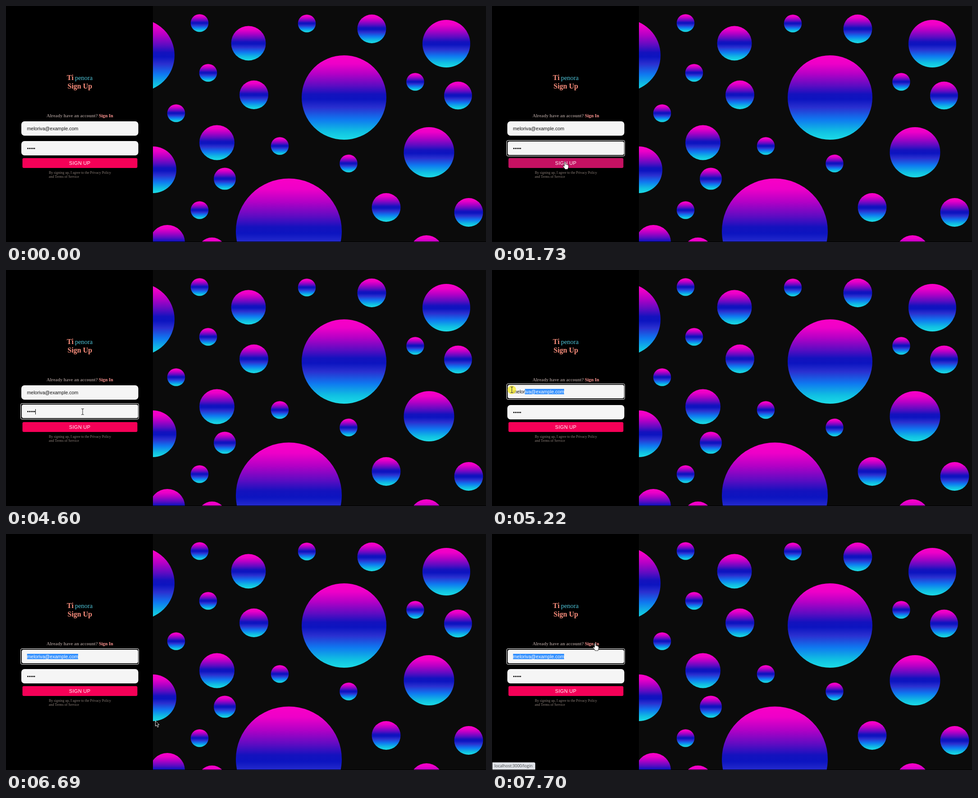
Recreate the animation shown at these times as an HTML page. Size 1065 px wide and 526 px high, loop 8000 ms.

```html
<!DOCTYPE html>
<html lang="en">
<head>
<meta charset="utf-8">
<title>Sign Up</title>
<style>
html, body { margin: 0; width: 100%; height: 100%; overflow: hidden; background: #000; }
svg { display: block; width: 100vw; height: 100vh; }
text { white-space: pre; }
.serif { font-family: "Liberation Serif", "Times New Roman", serif; }
.sans { font-family: "Liberation Sans", Arial, sans-serif; }
.bold { font-weight: 700; }
.salmon { fill: #fa8e7c; }
.field { fill: #f5f5f5; }
.value { font-size: 10.6px; fill: #111; }

/* every track shares one 8 s clock */
.track { animation: 8s linear infinite; }
.cut { animation: 8s step-end infinite; }

#email { animation-name: lift-email; }
#password { animation-name: lift-password; }
#button { animation-name: hover-button; }
#email .ring { animation-name: focus-email; }
#password .ring { animation-name: focus-password; }
#selection { animation-name: select; }
#caret { animation-name: blink; }
#status { animation-name: status; }
#pointer { animation-name: travel; }
#press { animation-name: press; }
#arrow { animation-name: arrow; }
#beam { animation-name: beam; }
#hand { animation-name: hand; }

@keyframes travel {
  0%, 3.37% { transform: translate(953px, 491px); }
  7.5% { transform: translate(560px, 385px); }
  10.6% { transform: translate(290px, 320px); }
  12.87%, 13.75% { transform: translate(190px, 314px); }
  16.8% { transform: translate(172px, 318px); }
  19.3% { transform: translate(163px, 338px); }
  21.5%, 30.1% { transform: translate(162px, 348px); }
  30.2%, 51.6% { transform: translate(164px, 351px); }
  53.5% { transform: translate(168px, 357px); }
  55.6% { transform: translate(172px, 330px); }
  57.5% { transform: translate(170px, 316px); }
  59.4% { transform: translate(167px, 286px); }
  61.37%, 63.2% { transform: translate(162px, 271px); }
  65.2%, 66% { transform: translate(44px, 267px); }
  67% { transform: translate(10px, 268px); }
  68.6% { transform: translate(10px, 300px); }
  70% { transform: translate(12px, 337px); }
  72.87%, 73.8% { transform: translate(44px, 283px); }
  74.7%, 75.6% { transform: translate(49px, 289px); }
  77.8%, 81.6% { transform: translate(344px, 357px); }
  83.6%, 84.5% { transform: translate(331px, 416px); }
  87.5% { transform: translate(290px, 340px); }
  89% { transform: translate(255px, 290px); }
  91.2%, 92.2% { transform: translate(232px, 258px); }
  96.2%, 100% { transform: translate(229px, 244px); }
}
@keyframes arrow {
  0%, 10.8%, 19.3%, 55.5%, 59.3%, 87.8%, 89.1%, 93.5% { opacity: 0; }
  3.37%, 18.75%, 54.75%, 58.4%, 72%, 88.8%, 92.6% { opacity: 1; }
}
@keyframes beam {
  0%, 18.75%, 58.4%, 72%, 88.8%, 92.6% { opacity: 0; }
  10.8%, 55.5%, 59.3%, 87.8%, 89.1% { opacity: 1; }
}
@keyframes hand {
  0%, 54.75% { opacity: 0; }
  19.3%, 93.5% { opacity: 1; }
}
@keyframes press {
  0%, 16.5%, 72% { opacity: 0; }
  14.25%, 63.25% { opacity: .72; }
}
@keyframes lift-email {
  0%, 59.3%, 76.2%, 89.2%, 93.8%, 100% { transform: none; }
  60.6%, 75.4%, 90.2%, 92.6% { transform: translateY(-2px); }
}
@keyframes lift-password {
  0%, 10.8%, 20%, 55.5%, 59.6%, 87.8%, 89.3%, 100% { transform: none; }
  12%, 18.7%, 56.5%, 58.4%, 88.5%, 88.8% { transform: translateY(-2px); }
}
@keyframes hover-button {
  0%, 19.4%, 56.5%, 100% { fill: #f50057; }
  20.8%, 54.7% { fill: #c51162; }
}
@keyframes focus-password {
  0%, 63.3% { opacity: 0; }
  14.25% { opacity: 1; }
}
@keyframes focus-email {
  0% { opacity: 0; }
  63.3% { opacity: 1; }
}
@keyframes select {
  0% { clip-path: inset(0 0 0 100%); }
  64.25% { clip-path: inset(0 0 0 62%); }
  65.2% { clip-path: inset(0 0 0 23.2%); }
  66.1%, 100% { clip-path: inset(0 0 0 0%); }
}
@keyframes blink {
  0%, 20.6%, 34.25%, 47.85%, 61.3% { opacity: 0; }
  14.25%, 27.37%, 40.87%, 54.6% { opacity: 1; }
}
@keyframes status {
  0% { opacity: 0; }
  95% { opacity: 1; }
}
</style>
</head>
<body>
<svg viewBox="0 0 1065 526" preserveAspectRatio="none">
  <defs>
    <linearGradient id="neon" x1="0" y1="0" x2="0" y2="1">
      <stop offset="0" stop-color="#fa00c6"/>
      <stop offset=".1" stop-color="#ee00c8"/>
      <stop offset=".22" stop-color="#b400c6"/>
      <stop offset=".36" stop-color="#5c0cc2"/>
      <stop offset=".46" stop-color="#1412be"/>
      <stop offset=".52" stop-color="#0c14c0"/>
      <stop offset=".62" stop-color="#2a30d0"/>
      <stop offset=".76" stop-color="#0f78f0"/>
      <stop offset=".9" stop-color="#10bfe2"/>
      <stop offset="1" stop-color="#1cdce6"/>
    </linearGradient>
    <clipPath id="panel"><rect x="326" width="739" height="525"/></clipPath>
  </defs>

  <rect width="1065" height="526"/>
  <g id="bubbles" clip-path="url(#panel)" fill="url(#neon)">
    <rect x="326" width="739" height="526" fill="#0b0b0b"/>
  </g>

  <g class="serif">
    <text class="bold salmon" x="135" y="165" font-size="16">Ti</text>
    <text x="153" y="165" font-size="14.4" fill="#4fc6da">penora</text>
    <text class="bold salmon" x="136.5" y="184" font-size="16">Sign Up</text>
    <text class="bold" x="90" y="248" font-size="10.3" fill="#8c7f7c">Already have an account?</text>
    <text class="bold" x="206" y="248" font-size="10.3" fill="#ff9490">Sign In</text>
    <g font-size="7.9" fill="#8c7f78">
      <text x="95" y="374.4">By signing up, I agree to the Privacy Policy</text>
      <text x="95" y="383.2">and Terms of Service</text>
    </g>
  </g>

  <g class="sans">
    <g id="email" class="track">
      <rect class="field" x="34" y="257" width="259.6" height="32" rx="7"/>
      <g class="ring cut">
        <rect x="32.5" y="255.5" width="262" height="35" rx="3" fill="#101010" stroke="#fff"/>
        <rect class="field" x="35" y="258" width="258" height="30" rx="4"/>
      </g>
      <text class="value" x="46.5" y="277">meloriva@example.com</text>
      <g id="selection" class="cut">
        <rect x="46.5" y="267" width="113.5" height="12" fill="#3390ff"/>
        <text class="value" x="46.5" y="277" style="fill:#fff">meloriva@example.com</text>
      </g>
    </g>

    <g id="password" class="track">
      <rect class="field" x="34" y="301" width="259.6" height="32" rx="7"/>
      <g class="ring cut">
        <rect x="32.5" y="299.5" width="262" height="35" rx="3" fill="#101010" stroke="#fff"/>
        <rect class="field" x="35" y="302" width="258" height="30" rx="4"/>
      </g>
      <text class="value" x="46.5" y="321">•••••</text>
      <rect id="caret" class="cut" x="65" y="312" width="1" height="12"/>
    </g>

    <rect id="button" class="track" x="36.5" y="339" width="255" height="22" rx="3"/>
    <text x="140" y="354.3" font-size="11" letter-spacing=".32" fill="#fff">SIGN UP</text>
  </g>

  <g id="status" class="cut">
    <path d="M1 509H93Q96 509 96 512V525H1Z" fill="#dee1e6"/>
    <text x="5.5" y="520.3" font-size="9" fill="#45494d" font-family="'Open Sans', 'Noto Sans', sans-serif">localhost:3000/login</text>
  </g>

  <g id="pointer" class="track">
    <circle id="press" class="cut" r="9.6" fill="#f7ea1c"/>
    <path id="arrow" class="cut" d="M.5 .5V12.2L3.2 9.8L5.2 14.6L7.3 13.7L5.3 9.1H9Z" fill="#000" stroke="#fff" stroke-width=".9"/>
    <path id="beam" class="cut" d="M-3 -6.5H-1L0 -5.5L1 -6.5H3M0 -5.5V5.5M-3 6.5H-1L0 5.5L1 6.5H3" fill="none" stroke="#333" stroke-width="1.1"/>
    <path id="hand" class="cut" d="M-1.6 .8Q-1.6 -.7 -.2 -.7T1.2 .8V5Q3.4 4.2 3.8 5.6Q5.6 4.9 6 6.4Q7.8 6 7.8 8V11Q7.8 13 6.4 14.2V16H-.6V14.4L-4.6 9.2Q-5.2 7.6 -3.8 7.4L-1.6 9.2Z" fill="#fff" stroke="#000" stroke-width=".8"/>
  </g>
</svg>
<script>
// centre x, centre y, radius
const bubbles = [
  [293, 110, 81], [538, 83, 38.5], [811.5, 51, 32], [977, 84, 53],
  [550, 198, 32], [750, 204, 94], [1003, 199.5, 31], [468, 304.5, 39],
  [938.5, 326, 56], [326, 365, 52], [485.5, 385, 24.5], [627.5, 502, 117.5],
  [843.5, 449, 32], [1026.5, 460, 32], [358, 527, 39], [457, 548, 32], [933, 547, 36]
];
const smallBubbles = [
  [429.5, 38], [667.5, 39], [448.5, 149], [377.5, 239],
  [908, 169], [607.5, 312], [760, 351], [429.5, 455]
];

const layer = document.getElementById('bubbles');
function addBubble([cx, cy, r = 19.8]) {
  const circle = document.createElementNS(layer.namespaceURI, 'circle');
  Object.entries({ cx, cy, r }).forEach(([name, value]) => circle.setAttribute(name, value));
  layer.append(circle);
}
[...bubbles, ...smallBubbles].forEach(addBubble);
</script>
</body>
</html>
```
